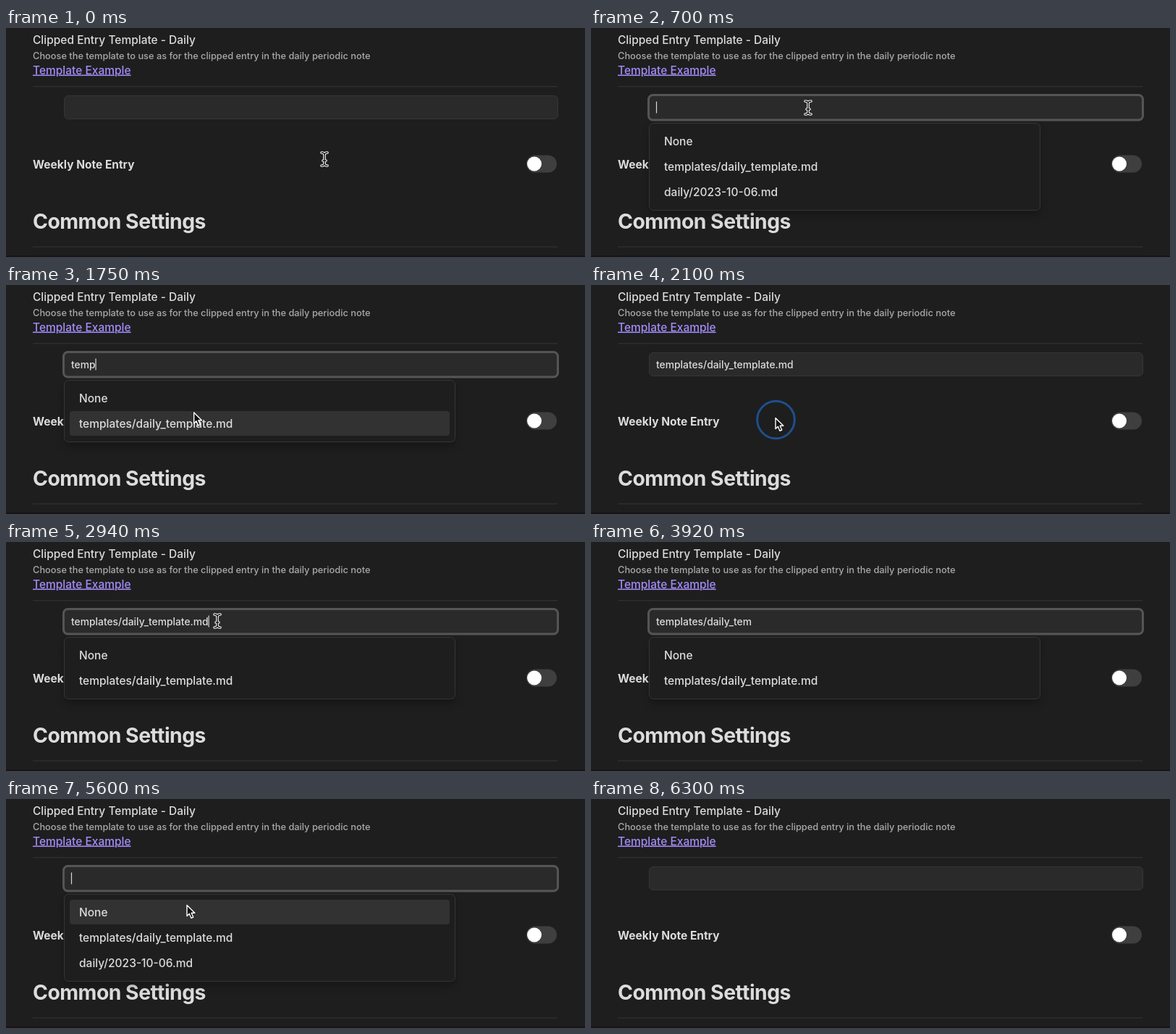
Recreate the animation shown at these times as an HTML page. Size 800 by 316 pixels, loop 6370 ms.

```html
<!DOCTYPE html>
<html lang="en">
<head>
<meta charset="utf-8">
<title>Template setting</title>
<style>
  html, body { margin: 0; width: 100%; height: 100%; overflow: hidden; background: #1e1e1e; }
  svg { display: block; width: 100vw; height: 100vh; }
  text { font: 500 15.5px Inter, "Noto Sans", sans-serif; fill: #dcdcdc; white-space: pre; }
  .muted { font-size: 12.8px; fill: #a9a9a9; }
  .link { fill: #a48bf8; text-decoration: underline; }
  .label { font-weight: 700; }
  .heading { font-size: 28.3px; font-weight: 700; letter-spacing: -.5px; }
  .field { font-size: 13.85px; }
  .rule { stroke: #363636; }
  #popup { filter: drop-shadow(0 7px 5px rgba(0, 0, 0, .22)); }
</style>
</head>
<body>
<svg viewBox="0 0 800 316">
  <rect width="800" height="316" fill="#1e1e1e"/>
  <rect y="314" width="800" height="2" fill="#171316"/>
  <text x="37" y="21.5">Clipped Entry Template - Daily</text>
  <text class="muted" x="37" y="43">Choose the template to use as for the clipped entry in the daily periodic note</text>
  <text class="link" x="37" y="63.5">Template Example</text>
  <path class="rule" d="M37 80.8H762M37 302H762"/>

  <rect id="input" x="80.5" y="93.5" width="682" height="32" rx="5.5" fill="#2a2a2a" stroke="#363636"/>
  <rect id="focus" x="79.5" y="92.5" width="683" height="34.5" rx="6" fill="none" stroke="#555" stroke-width="3"/>
  <text id="value" class="field" x="90" y="115"></text>
  <path id="caret" stroke="#dadada" stroke-width="1.2"/>

  <text class="label" x="37" y="193.5">Weekly Note Entry</text>
  <rect x="719" y="175.5" width="42" height="24" rx="12" fill="#3f3f3f"/>
  <circle cx="730" cy="187.5" r="10" fill="#fff"/>
  <text class="heading" x="37" y="277">Common Settings</text>

  <g id="popup">
    <rect id="panel" x="80.5" y="131.5" width="540" rx="6" fill="#1e1e1e" stroke="#363636"/>
    <rect id="hover" x="88" width="525" height="34" rx="4" fill="#323232"/>
    <text x="101" y="162">None</text>
    <text x="101" y="197">templates/daily_template.md</text>
    <text id="extra" x="101" y="232">daily/2023-10-06.md</text>
  </g>

  <circle id="ring" r="25.8" fill="none" stroke="#1f4f8d" stroke-width="3"/>
  <g id="pointer">
    <path id="arrow" d="M0 0V15L3.3 11.8 5.9 17.8 8.7 16.5 6.2 10.7H10.8Z" fill="#111" stroke="#fff" stroke-width="1.4" stroke-linejoin="round"/>
    <g id="beam" fill="none" stroke-linecap="round">
      <path d="M-4-9Q0-9 0-6V6Q0 9-4 9M4-9Q0-9 0-6V6Q0 9 4 9M-2 2H2" stroke="#fff" stroke-width="3.6"/>
      <path d="M-4-9Q0-9 0-6V6Q0 9-4 9M4-9Q0-9 0-6V6Q0 9 4 9M-2 2H2" stroke="#111" stroke-width="1.4"/>
    </g>
  </g>
</svg>
<script>
const LOOP = 6370, STEP = 70;
const PATH = "templates/daily_template.md";
const $ = Object.fromEntries([...document.querySelectorAll("[id]")].map(el => [el.id, el]));

// Pointer stops: time, x, y
const stops = [
  [0, 440, 181], [70, 440, 181], [420, 300, 110], [980, 300, 110],
  [1470, 300, 112], [1820, 255, 183.5], [2170, 255, 183.5],
  [2590, 292, 109], [4970, 292, 109], [5460, 250, 146.5],
  [5880, 250, 146.5], [6230, 440, 330], [LOOP, 440, 330]
];
const clicks = [490, 1960, 2590, 5740];

const within = (t, a, b) => t >= a && t < b;
const clamp = (v, lo, hi) => Math.max(lo, Math.min(hi, v));
const show = (el, on) => el.setAttribute("visibility", on ? "visible" : "hidden");
const set = (el, attrs) => {
  for (const name in attrs) el.setAttribute(name, attrs[name]);
};

function pointerAt(t) {
  const i = stops.findIndex((s, k) => k && t < s[0]);
  const [t0, x0, y0] = stops[i - 1], [t1, x1, y1] = stops[i];
  const u = (t - t0) / (t1 - t0), e = u * u * (3 - 2 * u);
  return [x0 + (x1 - x0) * e, y0 + (y1 - y0) * e];
}

function valueAt(t) {
  if (t < 2030) return PATH.slice(0, clamp(Math.floor((t - 980) / 98) + 1, 0, 4));
  const erased = Math.floor((t - 3430) / 56);
  return PATH.slice(0, clamp(PATH.length - erased, 0, PATH.length));
}

function render(t) {
  const [x, y] = pointerAt(t);
  const value = valueAt(t);
  const focused = within(t, 560, 2030) || within(t, 2660, 5880);
  const typing = within(t, 980, 1470) || within(t, 3360, 4970);
  const rows = value ? 2 : 3;

  $.value.textContent = value;
  show($.focus, focused);
  show($.caret, focused && !typing);
  const caretX = value ? 90.5 + $.value.getComputedTextLength() : 90.5;
  set($.caret, { d: `M${caretX} 101.5V117.5` });

  $.popup.style.display = focused ? "" : "none";
  $.extra.style.display = rows === 3 ? "" : "none";
  set($.panel, { height: 15 + rows * 35 });
  const row = Math.floor((y - 139) / 35);
  $.hover.style.display = !typing && row >= 0 && row < rows ? "" : "none";
  set($.hover, { y: 139 + row * 35 });

  const beam = y < 128 || t < 420;
  show($.pointer, !typing);
  $.beam.style.display = beam ? "" : "none";
  $.arrow.style.display = beam ? "none" : "";
  set($.pointer, { transform: `translate(${x} ${y})` });

  const pressed = clicks.some(c => within(t, c, c + 210));
  show($.ring, pressed);
  set($.ring, { cx: x + .5, cy: y + 2.5 });
}

function tick(now) {
  render(Math.floor((now % LOOP) / STEP) * STEP);
  requestAnimationFrame(tick);
}
render(0);
requestAnimationFrame(tick);
</script>
</body>
</html>
```
